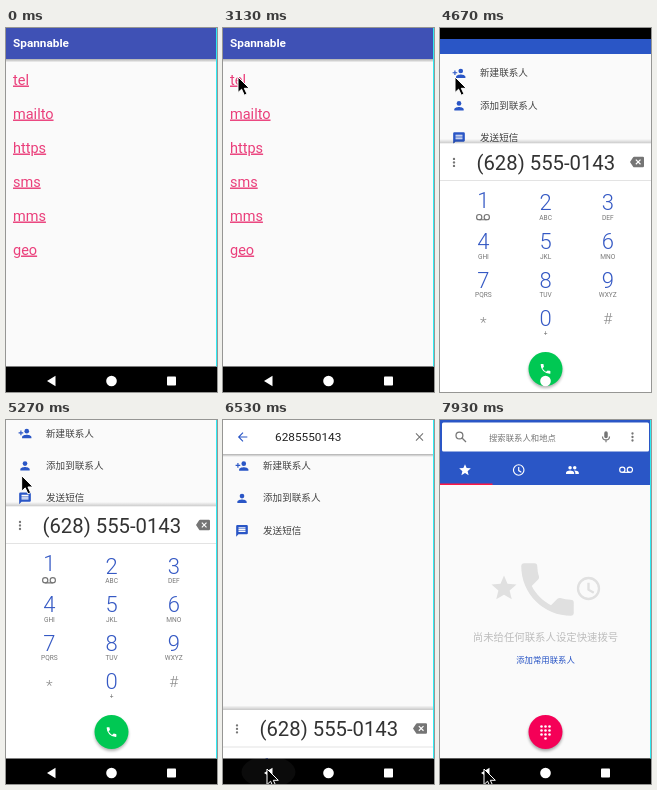
An HTML page for the animation above (8000 ms loop, 211x364 px).

```html
<!DOCTYPE html>
<html lang="zh-CN">
<head>
<meta charset="utf-8">
<title>Spannable</title>
<style>
html, body { margin: 0; width: 100%; height: 100%; overflow: hidden; background: #000; }
svg { display: block; width: 211px; height: 364px; font-family: Roboto, "Noto Sans CJK SC", "Noto Sans CJK", sans-serif; }
.mid { text-anchor: middle; }
.link { fill: #ea3f7b; font-size: 14.5px; text-decoration: underline; }
.digit { fill: #3559c4; font-size: 22px; font-weight: 300; }
.sub { fill: #777; font-size: 6.6px; }
.symbol { fill: #8a8a8a; font-size: 15.5px; font-weight: 300; }
.blue { fill: #2a56c6; }
.item { fill: #444; font-size: 9.6px; }
.line { fill: none; stroke: currentColor; stroke-width: 2; }
</style>
</head>
<body>
<svg viewBox="0 0 211 364">
<defs>
  <linearGradient id="fade" x2="0" y2="1"><stop stop-opacity=".3"/><stop offset="1" stop-opacity="0"/></linearGradient>
  <linearGradient id="rise" x2="0" y2="1"><stop stop-opacity="0"/><stop offset="1" stop-opacity=".2"/></linearGradient>
  <filter id="soft" x="-50%" y="-50%" width="200%" height="200%"><feGaussianBlur stdDeviation="1.6"/></filter>
  <clipPath id="navClip"><path d="M0 338.5h211V364H0z"/></clipPath>
  <symbol id="star" viewBox="0 0 24 24"><path d="M12 17.3 18.2 21l-1.7-7L22 9.2l-7.2-.6L12 2 9.2 8.6 2 9.2 7.5 14l-1.7 7z"/></symbol>
  <symbol id="phone" viewBox="0 0 24 24"><path d="M6.6 10.8c1.4 2.8 3.8 5.1 6.6 6.6l2.2-2.2q.5-.4 1-.3 1.7.6 3.6.6a1 1 0 0 1 1 1V20a1 1 0 0 1-1 1A17 17 0 0 1 3 4a1 1 0 0 1 1-1h3.5a1 1 0 0 1 1 1q0 1.9.6 3.6.1.5-.3 1z"/></symbol>
  <symbol id="clock" viewBox="0 0 24 24"><g class="line"><circle cx="12" cy="12" r="9"/><path d="M12 7v6l4.5 2.7"/></g></symbol>
  <symbol id="person" viewBox="0 0 24 24"><circle cx="12" cy="8" r="4"/><path d="M4 20v-2c0-2.7 5.3-4 8-4s8 1.3 8 4v2z"/></symbol>
  <symbol id="personAdd" viewBox="0 0 24 24"><circle cx="15" cy="8" r="4"/><path d="M7 20v-2c0-2.7 5.3-4 8-4s8 1.3 8 4v2zM4 7h2v3h3v2H6v3H4v-3H1v-2h3z"/></symbol>
  <symbol id="people" viewBox="0 0 24 24"><circle cx="8" cy="8" r="3"/><circle cx="16" cy="8" r="3"/><path d="M1 19v-2.5C1 14.2 5.7 13 8 13s7 1.2 7 3.5V19zM17 19v-2.5q0-2-2-3.4c3-.3 8 1 8 3.4V19z"/></symbol>
  <symbol id="voicemail" viewBox="0 0 24 24"><g class="line"><circle cx="5.5" cy="11.5" r="4.5"/><circle cx="18.5" cy="11.5" r="4.5"/><path d="M5.5 16h13"/></g></symbol>
  <symbol id="message" viewBox="0 0 24 24"><path fill-rule="evenodd" d="M4 2h16a2 2 0 0 1 2 2v12a2 2 0 0 1-2 2H6l-4 4V4a2 2 0 0 1 2-2zm2 4v2h12V6zm0 3v2h12V9zm0 3v2h12v-2z"/></symbol>
  <symbol id="back" viewBox="0 0 24 24"><path class="line" d="M20 12H5M12 4l-8 8 8 8"/></symbol>
  <symbol id="close" viewBox="0 0 24 24"><path class="line" d="M5.5 5.5l13 13m0-13-13 13"/></symbol>
  <symbol id="erase" viewBox="0 0 24 24"><path d="M22 3H7q-1 0-1.6.9L0 12l5.4 8.1Q6 21 7 21h15a2 2 0 0 0 2-2V5a2 2 0 0 0-2-2z"/><path d="M10 8l8 8m0-8-8 8" stroke="#fff" stroke-width="2"/></symbol>
  <symbol id="dots" viewBox="0 0 24 24"><circle cx="12" cy="6" r="2"/><circle cx="12" cy="12" r="2"/><circle cx="12" cy="18" r="2"/></symbol>
  <symbol id="lens" viewBox="0 0 24 24"><g class="line"><circle cx="9.5" cy="9.5" r="5.5"/><path d="M14 14l6 6"/></g></symbol>
  <symbol id="mic" viewBox="0 0 24 24"><rect x="9" y="2" width="6" height="12" rx="3"/><path class="line" d="M6 11a6 6 0 0 0 12 0M12 17v4"/></symbol>
</defs>

<g id="page">
  <path fill="#303f9f" d="M-3-18h217V0H-3z"/>
  <path fill="#fafafa" d="M-3 0h217v338.5H-3z"/>
  <path fill="#3f51b5" d="M-3 0h217v31H-3z"/>
  <path fill="url(#fade)" d="M-3 31h217v3.5H-3z"/>
  <text x="7" y="19" fill="#fff" font-size="11.8" font-weight="700">Spannable</text>
  <rect id="press" x="7" y="43" width="16" height="17" fill="#ff4081" opacity=".4"/>
  <g id="links"></g>
  <path id="dim" d="M-3-18h217v356.5H-3z"/>
</g>

<g id="dialer">
  <path class="blue" d="M0-18h211v15H0z"/>
  <path fill="#fafafa" d="M0-3h211v341.5H0z"/>
  <g id="list"></g>
  <g id="search">
    <path fill="#fff" d="M0 0h211v34H0z"/>
    <path fill="url(#fade)" d="M0 34h211v3H0z"/>
    <text x="52" y="21.3" fill="#222" font-size="11.8">6285550143</text>
  </g>
  <g id="favorites">
    <path fill="#fafafa" d="M0 0h211v338.5H0z"/>
    <path class="blue" d="M0 0h211v65H0z"/>
    <rect x="2" y="2.5" width="207" height="29" rx="1.5" fill="#fff"/>
    <path fill="#ff1744" d="M0 63.5h52.5V65H0z"/>
    <text x="49" y="20.5" fill="#777" font-size="8.4">搜索联系人和地点</text>
    <text class="mid" x="105.5" y="221" fill="#bdbdbd" font-size="10.4">尚未给任何联系人设定快速拨号</text>
    <text class="mid blue" x="105.5" y="242.5" font-size="8.4">添加常用联系人</text>
  </g>
  <g id="fab">
    <circle cy="2" r="17" opacity=".35" filter="url(#soft)"/>
    <circle r="17" fill="#f50057"/>
    <g id="grid" fill="#fff"></g>
  </g>
  <g id="pad">
    <path fill="url(#rise)" d="M0 82h211v4.500H0z"/>
    <path fill="#fff" d="M0 86.5h211V345H0z"/>
    <path fill="#e3e3e3" d="M0 123h211v1H0z"/>
    <text x="36.5" y="113" fill="#333" font-size="20.3">(628) 555-0143</text>
    <g id="keys"></g>
    <circle cx="105.5" cy="314" r="17" opacity=".3" filter="url(#soft)"/>
    <circle cx="105.5" cy="312" r="17" fill="#00c853"/>
  </g>
  <path d="M0 338.5h211v450H0z"/>
</g>
<path id="edge" fill="#2feaf2" d="M210 0h1v338.5h-1z"/>

<g clip-path="url(#navClip)"><ellipse id="ripple" cx="45.5" cy="352" ry="16" fill="#fff"/></g>
<g fill="#fff">
  <path d="M41 353l8.5-5.2v10.4z"/>
  <circle cx="105.5" cy="353" r="5.3"/>
  <rect x="161" y="348.5" width="9" height="9" rx=".8"/>
</g>
<path id="cursor" d="M0 0v15.5l3.6-3.3 2.7 6 2.7-1.2-2.7-5.7h5z" stroke="#fff"/>
</svg>

<script>
const LOOP = 8000;
const $ = id => document.getElementById(id);
const add = (parent, markup) => $(parent).insertAdjacentHTML("beforeend", markup);
const icon = (parent, name, cx, cy, size, color) => add(parent,
  `<use href="#${name}" x="${cx - size / 2}" y="${cy - size / 2}" width="${size}" height="${size}" fill="${color}" color="${color}"/>`);
const text = (parent, cls, x, y, value) => add(parent, `<text class="${cls}" x="${x}" y="${y}">${value}</text>`);

const BLUE = "#2a56c6", GREY = "#757575";
["tel", "mailto", "https", "sms", "mms", "geo"].forEach((s, i) => text("links", "link", 7, 56.5 + i * 34, s));

[["personAdd", "新建联系人"], ["person", "添加到联系人"], ["message", "发送短信"]].forEach(([name, label], i) => {
  icon("list", name, 19, 13.5 + i * 32.4, 14, BLUE);
  text("list", "item", 40, 16.5 + i * 32.4, label);
});

icon("search", "back", 20, 17, 13, BLUE);
icon("search", "close", 196.5, 17, 13, GREY);

["star", "clock", "people", "voicemail"].forEach((name, i) => icon("favorites", name, 25 + i * 53.7, 50, 14, "#fff"));
icon("favorites", "lens", 21, 17, 15, GREY);
icon("favorites", "mic", 166, 17, 14, GREY);
icon("favorites", "dots", 192.5, 17, 14, GREY);
icon("favorites", "star", 64, 168, 30, "#e0e0e0");
icon("favorites", "phone", 107.5, 169.5, 70, "#e0e0e0");
icon("favorites", "clock", 148.5, 168.5, 28, "#e0e0e0");

icon("pad", "dots", 14, 105.5, 14, GREY);
icon("pad", "erase", 197, 105, 14, GREY);
icon("pad", "phone", 105.5, 312, 13, "#fff");
const letters = ["", "ABC", "DEF", "GHI", "JKL", "MNO", "PQRS", "TUV", "WXYZ", "", "+", ""];
[..."123456789*0#"].forEach((key, i) => {
  const x = 43.4 + (i % 3) * 62.2, y = 153.5 + Math.floor(i / 3) * 38.6;
  const symbol = "*#".includes(key);
  const lift = { 1: -2.5, "*": 1.5, "#": -2 }[key] || 0;
  text("keys", symbol ? "mid symbol" : "mid digit", x, y + lift, key);
  text("keys", "mid sub", x, y + 9.5, letters[i]);
});
icon("keys", "voicemail", 43, 160.5, 14, GREY);

for (let i = 0; i < 10; i++) {
  const [x, y] = i < 9 ? [i % 3 - 1, Math.floor(i / 3) - 1] : [0, 2];
  add("grid", `<circle cx="${x * 4}" cy="${y * 4 - 1.5}" r="1.3"/>`);
}

const cursorKeys = [[800, -8, 90], [1100, 44, 84], [1350, 56, 74], [1600, 26, 73], [2000, 10, 73],
  [2270, 10, 73], [3000, 15, 49], [5200, 15, 49], [6000, 44, 349], [LOOP, 44, 349]];

const progress = (t, start, length) => Math.min(1, Math.max(0, (t - start) / length));
const easeOut = p => 1 - (1 - p) ** 3;
const smooth = p => p * p * (3 - 2 * p);
const show = (id, on) => $(id).style.display = on ? "" : "none";
const move = (id, transform) => $(id).setAttribute("transform", transform);
const fade = (id, opacity) => $(id).setAttribute("opacity", opacity);

function cursorAt(t) {
  const i = Math.max(1, cursorKeys.findIndex(k => k[0] > t));
  const [a, b] = [cursorKeys[i - 1], cursorKeys[i]];
  const p = smooth(progress(t, a[0], b[0] - a[0]));
  return [1, 2].map(k => a[k] + (b[k] - a[k]) * p);
}

function draw(t) {
  // Opening the dialer: the page shrinks and dims, then both windows slide up.
  const shrink = easeOut(progress(t, 4240, 160));
  const slide = easeOut(progress(t, 4440, 396));
  const drop = 400 * (1 - slide);
  const scale = 1 - 0.067 * shrink;
  move("page", `translate(105.5 ${210 - 400 * slide}) scale(${scale}) translate(-105.5 -210)`);
  fade("dim", 0.4 * shrink);
  show("page", slide < 1);
  show("press", t >= 3870);
  move("dialer", `translate(0 ${drop})`);
  show("dialer", slide > 0);
  show("edge", shrink === 0 || slide === 1);

  // First back press hides the keypad, the second one leaves the search.
  const header = easeOut(progress(t, 6390, 130));
  move("search", `translate(0 ${-38 * (1 - header)})`);
  show("search", header > 0);
  move("list", `translate(0 ${32.5 * header + 0.1 * drop})`);
  move("pad", `translate(0 ${256 * easeOut(progress(t, 6408, 300))})`);
  move("fab", `translate(105.5 312) scale(${easeOut(progress(t, 6690, 180))})`);
  fade("favorites", smooth(progress(t, 7180, 300)));

  const press = t < 6930 ? 6060 : 6930;
  const grow = easeOut(progress(t, press, 130));
  $("ripple").setAttribute("rx", 27 * grow);
  fade("ripple", t < press ? 0 : 0.23 * (1 - progress(t, press + 220, 310)));

  move("cursor", `translate(${cursorAt(t)})`);
  show("cursor", t >= 800);
}

function tick() {
  draw(performance.now() % LOOP);
  requestAnimationFrame(tick);
}
tick();
</script>
</body>
</html>
```
